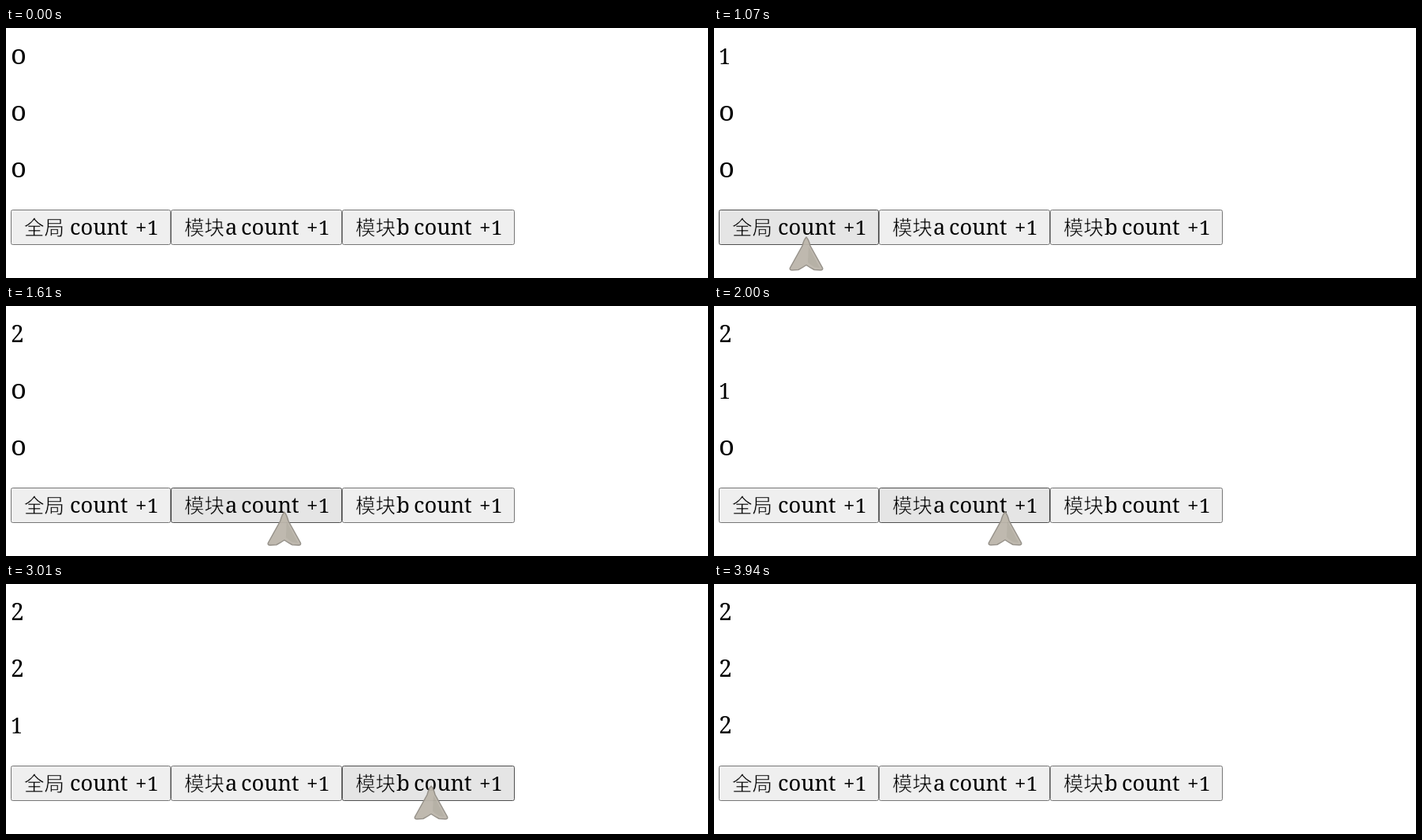
These frames come from a looping animation (890 px wide and 318 px high, 4490 ms). An HTML page:

```html
<!DOCTYPE html>
<html lang="zh">
<head>
<meta charset="utf-8">
<title>count</title>
<style>
  html, body { margin: 0; width: 100%; height: 100%; overflow: hidden; background: #fff; }
  svg { display: block; width: 100vw; height: 100vh; }
  text { font: 500 27.3px "Noto Serif", serif; fill: #000; }
  /* The thin pale outline slims the strokes. */
  .han { font: 300 25.5px "Noto Sans CJK SC", "Noto Sans CJK", sans-serif; stroke: #ececec; stroke-width: .6px; }
  .sign { font-size: 26px; }
</style>
</head>
<body>
<svg viewBox="0 0 890 318">
  <g id="counts"></g>
  <g id="buttons"></g>
  <g id="cursor" stroke-linejoin="round" opacity=".95">
    <path d="M0 1Q3 4 5 12L20.500 40Q21.500 43 18 43L10 42.500Q5 40 0 36.500Q-5 40 -10 42.500L-18 43Q-21.500 43 -20.500 40L-5 12Q-3 4 0 1Z" fill="#bcb6ab" stroke="#918c84" stroke-width="1.500"/>
    <path d="M3 13L17 40L10 39Q5 36 2 33Z" fill="#aaa499" opacity=".5"/>
  </g>
</svg>
<script>
const NS = 'http://www.w3.org/2000/svg';
const LOOP = 4490, STEP = 77.5, PRESS = 70, GONE = 3940;
const TOP = 231, BOTTOM = 276;
const $ = id => document.getElementById(id);

function add(parent, tag, attrs, label = '') {
  const el = document.createElementNS(NS, tag);
  for (const key in attrs) el.setAttribute(key, attrs[key]);
  el.textContent = label;
  parent.appendChild(el);
  return el;
}

// Old-style figures: all stand at x-height, so zero is a round "o".
const glyphs = ['o', '1', '2'];
const sizes = [34.5, 27, 30];
const counters = [0, 1, 2].map(i => add($('counts'), 'text', { x: 6, y: 45.5 + 72 * i }));

const edges = [6, 209, 426, 645];
const buttons = [['全局', ''], ['模块', 'a'], ['模块', 'b']].map(([han, letter], i) => {
  const g = $('buttons'), left = edges[i], right = edges[i + 1];
  const word = (x, label, cls = '') => add(g, 'text', { x, y: 263, class: cls }, label);
  const box = add(g, 'rect', {
    x: left + .5, y: TOP + .5, width: right - left - 1, height: BOTTOM - TOP - 1, rx: 2
  });
  word(left + 17, han, 'han');
  word(left + 69, letter);
  word(right - 128, 'count');
  word(right - 45, '+', 'sign');
  word(right - 30, '1', 'sign');
  return { left, right, box };
});

const easeOut = p => 1 - (1 - p) ** 3;
const easeIn = p => p * p;

// Pointer moves: start time, number of steps, end point, easing.
const entry = { x: 240, y: 320 };
const moves = [
  { at: 210, steps: 5, x: 116, y: 267 },
  { at: 1070, steps: 1, x: 117, y: 265 },
  { at: 1450, steps: 5, x: 369, y: 261 },
  { at: 2550, steps: 1, x: 405, y: 262 },
  { at: 2630, steps: 3, x: 539, y: 256 },
  { at: 3710, steps: 3, x: 761, y: 298, ease: easeIn }
];

function pointer(t) {
  if (t < moves[0].at || t >= GONE) return null;
  let { x, y } = entry;
  for (const m of moves) {
    if (t < m.at) break;
    const done = Math.min(m.steps, 1 + Math.floor((t - m.at) / STEP));
    const p = (m.ease || easeOut)(done / m.steps);
    x += (m.x - x) * p;
    y += (m.y - y) * p;
  }
  return { x, y };
}

// Each button is clicked twice in turn.
const clicks = [750, 1220, 1930, 2400, 2930, 3560];

const looks = {
  rest: ['#efefef', '#767676'],
  hover: ['#e5e5e5', '#4f4f4f'],
  down: ['#f5f5f5', '#8d8d8d']
};

function draw(t) {
  const spot = pointer(t);
  $('cursor').setAttribute('visibility', spot ? 'visible' : 'hidden');
  if (spot) $('cursor').setAttribute('transform', `translate(${spot.x} ${spot.y})`);

  const pressed = clicks.some(at => t >= at && t < at + PRESS);
  const total = clicks.filter(at => t >= at + PRESS).length;
  buttons.forEach(({ left, right, box }, i) => {
    const over = spot && spot.x >= left && spot.x < right && spot.y < BOTTOM;
    const [fill, stroke] = looks[over ? (pressed ? 'down' : 'hover') : 'rest'];
    box.setAttribute('fill', fill);
    box.setAttribute('stroke', stroke);

    const value = Math.max(0, Math.min(2, total - 2 * i));
    counters[i].textContent = glyphs[value];
    counters[i].setAttribute('aria-label', value);
    counters[i].style.fontSize = sizes[value] + 'px';
  });
}

const start = performance.now();
function tick(now) {
  draw(Math.max(0, now - start) % LOOP);
  requestAnimationFrame(tick);
}
draw(0);
requestAnimationFrame(tick);
</script>
</body>
</html>
```
